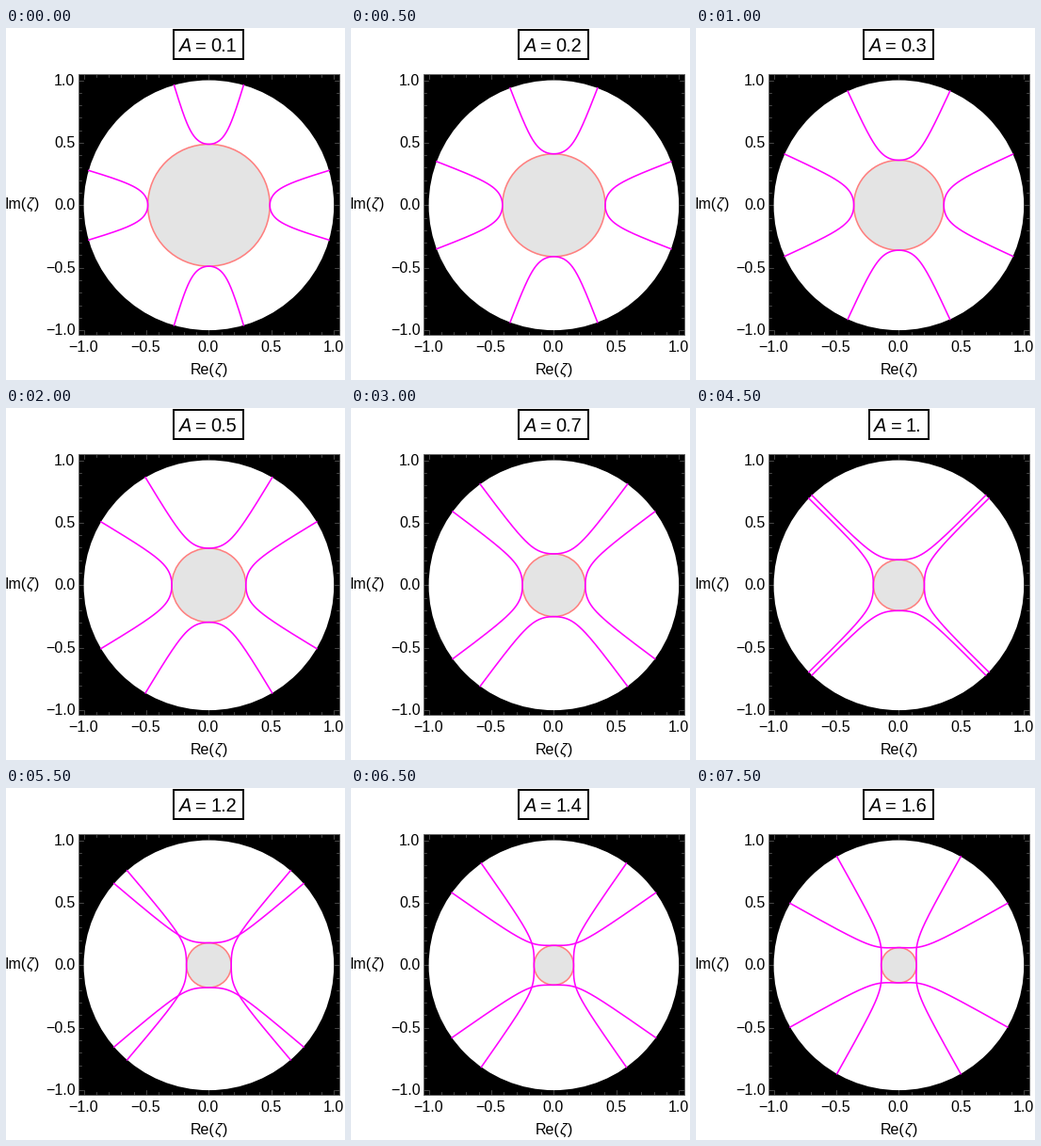
Recreate the animation shown at these times as a matplotlib script. Size 360 px wide and 374 px high, loop 8000 ms.

```python
import numpy as np
import matplotlib.pyplot as plt
from matplotlib.animation import FuncAnimation
from matplotlib.patches import Circle, Rectangle

W, H, DPI = 360, 374, 100
CX, CY, R = 215.4, 188.3, 132.8
LEFT, TOP, SIDE = 76.5, 48.5, 277
PX = 72 / DPI

plt.rcParams["font.family"] = "Liberation Sans"
fig = plt.figure(figsize=(W / DPI, H / DPI), dpi=DPI, facecolor="white")
ax = fig.add_axes([0, 0, 1, 1])
ax.set_xlim(0, W)
ax.set_ylim(H, 0)
ax.axis("off")


def label(x, y, s, size=16, **kw):
    return ax.text(x, y, s, fontsize=size * PX, va="baseline", **kw)


def line(x, y, color, width, **kw):
    return ax.plot(x, y, color=color, lw=width * PX, **kw)[0]


def draw_plot_frame():
    ax.add_patch(Rectangle((LEFT, TOP), SIDE, SIDE, fc="black", ec="#606060", lw=PX))
    right, bottom = LEFT + SIDE, TOP + SIDE
    for k in range(-10, 11):
        n = 5 if k % 5 == 0 else 3
        x, y = CX + R * k / 10, CY - R * k / 10
        for xs, ys in (
            ([x, x], [TOP, TOP + n]),
            ([x, x], [bottom, bottom - n]),
            ([LEFT, LEFT + n], [y, y]),
            ([right, right - n], [y, y]),
        ):
            line(xs, ys, "#606060", 0.7, zorder=2)
    ax.add_patch(Circle((CX, CY), R, fc="white", ec="none", zorder=3))
    for v in (-1, -0.5, 0, 0.5, 1):
        s = f"{v:.1f}".replace("-", "\u2212")
        label(CX - 0.6 + R * v, 344.3, s, ha="center")
        label(73.5, CY - R * v + 5.1, s, ha="right")


def axis_label(x, y, name, width):
    label(x, y, name + "(")
    label(x + width, y, "\u03b6", style="italic")
    label(x + width + 8.3, y, ")")


def tip_radius(a):
    """Distance from the centre to the nearest point of each branch."""
    knots = np.sqrt([0.1, 0.3, 0.5, 0.7, 0.9, 1.2, 1.6])
    radii = [0.488, 0.360, 0.296, 0.251, 0.218, 0.179, 0.141]
    return np.exp(np.interp(np.sqrt(a), knots, np.log(radii)))


def branch(a):
    """Right-hand branch: cos(2 theta) = p + q / r**n, from tip to unit circle."""
    r0 = tip_radius(a)
    end = 0.935 - 0.895 * a - 0.005 * a * a
    n = 3 + 3.5 * np.exp(-3 * a)
    q = (1 - end) / (r0 ** -n - 1)
    r = r0 + (1 - r0) * np.linspace(0, 1, 120) ** 2
    theta = np.arccos(np.clip(end - q + q / r ** n, -1, 1)) / 2
    x, y = r * np.cos(theta), r * np.sin(theta)
    return np.r_[x[::-1], x[1:]], np.r_[y[::-1], -y[1:]]


draw_plot_frame()
axis_label(-1.5, 192.3, "Im", 23.5)
axis_label(195.5, 368.3, "Re", 25.8)

disk = ax.add_patch(Circle((CX, CY), 1, fc="#e4e4e4", ec="#ff8080", lw=1.6 * PX, zorder=4))
arms = [line([], [], "#ff00ff", 1.6, zorder=5) for _ in range(4)]
box = ax.add_patch(Rectangle((0, 2), 1, 31, fc="white", ec="black", lw=2 * PX))
letter = label(0, 25.3, "A", 20, style="italic")
equals = label(0, 25.3, "=", 20, ha="center")
number = label(0, 25.3, "", 20)


def update(i):
    a = (i + 1) / 10
    disk.set_radius(R * tip_radius(a))
    x, y = branch(a)
    for arm, (u, v) in zip(arms, ((x, y), (-y, x), (-x, -y), (y, -x))):
        arm.set_data(CX + R * u, CY - R * v)

    # A whole value loses its last digit, so the box shrinks around it.
    whole = i == 9
    inset = 5.5 if whole else 0
    number.set_text("1." if whole else f"{a:.1f}")
    box.set_x(178 + inset)
    box.set_width(74 - 2 * inset)
    letter.set_x(183.8 + inset)
    equals.set_x(207.2 + inset)
    number.set_x(217.5 + inset)
    return [disk, *arms, box, letter, equals, number]


anim = FuncAnimation(fig, update, frames=16, interval=500, repeat=True, repeat_delay=0)
plt.show()
```
